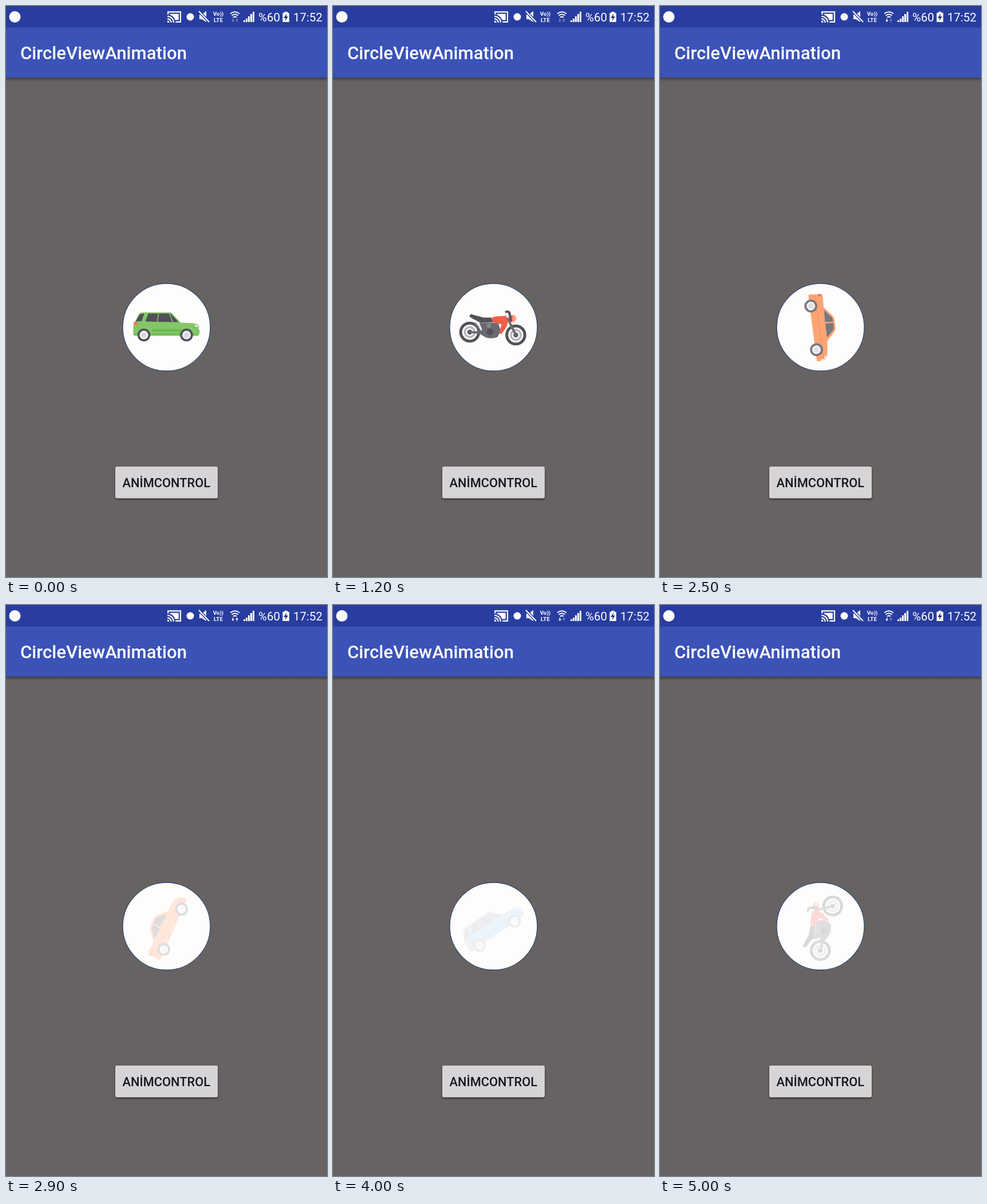
Animation, 561 px wide and 998 px high, one loop 5.1 s. Source, as an HTML page:

```html
<!DOCTYPE html>
<html lang="tr">
<head>
<meta charset="utf-8">
<title>CircleViewAnimation</title>
<style>
  html, body { margin: 0; width: 100%; height: 100%; overflow: hidden; background: #676362; }
  svg { display: block; width: 561px; height: 998px; font-family: Roboto, sans-serif; }
</style>
</head>
<body>
<svg viewBox="0 0 561 998">
  <defs>
    <linearGradient id="shade" x2="0" y2="1">
      <stop stop-opacity=".38"/><stop offset="1" stop-opacity="0"/>
    </linearGradient>
    <filter id="soft" x="-10%" y="-20%" width="120%" height="150%"><feGaussianBlur stdDeviation="1.6"/></filter>
    <g id="wheel">
      <circle r="11.3" fill="#515059"/><circle r="7.6" fill="#eeedf0"/><circle r="4.6" fill="#dad8dc"/>
    </g>
    <g id="spoked" fill="none">
      <circle r="15.8" stroke="#515059" stroke-width="5"/>
      <circle r="8.6" stroke="#b9b7bd" stroke-width="3.6"/>
      <circle r="4.2" fill="#515059"/>
    </g>
    <g id="hatchback">
      <path fill="currentColor" d="M-58 0L-56-8-49-22Q-47-26-42-26H4Q9-26 11-23L25-8 47-7Q55-6 57-2L56 3 58 6V10L55 15H-55Q-59 14-58 8Z"/>
      <path class="trim" d="M-23 5.5H24" stroke-width="4.5" stroke-linecap="round"/>
      <path class="trim" d="M-58 12H56" stroke-width="2"/>
      <path fill="#515059" d="M-54-10L-47-22Q-45-24-39-24L-43-11ZM-37-10L-32-24H6Q9-23 10-21L21-9 12-9Z"/>
      <path stroke="currentColor" stroke-width="1.6" fill="none" d="M-14-24L-16-9M5-24L11-9"/>
      <path fill="#ff7058" d="M-57-9H-51V-4H-58Z"/>
      <path fill="#fff0d0" d="M49-5Q55-4 56-1H52Q49-2 49-5Z"/>
      <use href="#wheel" x="-39.5" y="13.5"/><use href="#wheel" x="35" y="13.5"/>
    </g>
  </defs>

  <rect width="561" height="998" fill="#676362"/>
  <rect y="125" width="561" height="7" fill="url(#shade)"/>
  <rect width="561" height="125" fill="#3b53b7"/>
  <rect width="561" height="37.5" fill="#283d9f"/>
  <text x="25" y="93" font-size="31.2" font-weight="500" fill="#fff">CircleViewAnimation</text>

  <!-- status bar -->
  <g fill="#fff" stroke="none">
    <circle cx="15.5" cy="19" r="10"/>
    <g transform="translate(281 6) scale(1.09)" fill="none" stroke="#fff" stroke-width="2">
      <path d="M2 8V4H22V20H14M1 11A10 10 0 0 1 11 21M1 15A6 6 0 0 1 7 21"/>
      <path fill="#fff" stroke="none" d="M5 7H19V17H13.4A13 13 0 0 0 5 8.6ZM1 18A3 3 0 0 1 4 21H1Z"/>
    </g>
    <circle cx="322" cy="19" r="6.5"/>
    <path d="M338 15H342L350 9V28L342 23H338Z"/>
    <path d="M337 9L355 28" stroke="#283d9f" stroke-width="5"/>
    <path d="M337 9L355 28" stroke="#fff" stroke-width="2"/>
    <g font-size="9.8" font-weight="700" text-anchor="middle">
      <text x="371" y="17">Vo))</text><text x="371" y="28">LTE</text>
    </g>
    <g fill="none" stroke="#fff" stroke-width="2">
      <path d="M392 13.5Q400 7 408 13.5M394.5 16.8Q400 12.3 405.5 16.8M397 20Q400 17.6 403 20"/>
    </g>
    <path id="down" d="M395.8 22H397.2V25H399L396.5 28 394 25H395.8Z"/>
    <path id="up" d="M402.8 28H404.2V25H406L403.5 22 401 25H402.8Z"/>
    <path d="M415 25H418V28H415ZM419 22H422V28H419ZM423 18H426V28H423ZM427 14H430V28H427ZM431 10H434V28H431Z"/>
    <text x="441" y="27" font-size="20.5">%60</text>
    <path d="M486.5 10H492V12H495V28H483.500V12H486.500Z"/>
    <path d="M490.500 13L485.500 21H489L487.500 26.500 493 18.500H489.500Z" fill="#182560"/>
    <text x="502" y="27" font-size="20.5">17:52</text>
  </g>

  <circle cx="280.5" cy="561.5" r="76.5" fill="#fffdfc" stroke="#2e4a70" stroke-width="1.3"/>

  <g id="stage">
    <g id="green" color="#83c766" stroke="none"><use href="#hatchback" style="--trim:#6cb653"/></g>
    <g id="blue" color="#4fb3ef"><use href="#hatchback" style="--trim:#1793db"/></g>
    <g id="orange">
      <path fill="#ff8a4c" d="M-59 9L-57-9Q-56-11-53-11L-34-10-18-23Q-15-26-10-26H3Q8-26 11-23L25-9 47-6Q56-4 57 1L55 4 59 8 58 14H-56Q-60 14-59 9Z"/>
      <path d="M-56 2H55" stroke="#f47a3f" stroke-width="2"/>
      <path fill="#515059" d="M-29-10L-16-21Q-14-23-10-23H-7L-8-9ZM-5-23H2Q6-23 8-21L19-9H-5Z"/>
      <path fill="#e94b3b" d="M-58-8H-54V-3H-58Z"/>
      <path fill="#fff0d0" d="M50-4Q55-3 56 0H52Z"/>
      <use href="#wheel" x="-39" y="12"/><use href="#wheel" x="38" y="12"/>
    </g>
    <g id="moto">
      <g transform="rotate(-4.3)">
        <use href="#spoked" x="-41.5" y="8.500"/><use href="#spoked" x="39" y="13.500"/>
        <path d="M-41 8.500L-10 10M-32-6L-22 9M25-15L39 13.500" fill="none" stroke="#6a6972" stroke-width="4" stroke-linecap="round"/>
        <path fill="#6a6972" d="M-25-8H8L13 6 7 17Q-2 21-13 18L-25 11-20 4Z"/>
        <circle cx="-6" cy="8" r="6" fill="#515059"/><circle cx="-8" cy="-3" r="4" fill="#85838b"/>
        <path fill="#515059" d="M-42-20Q-41-24-36-22L-18-17-4-17 2-9-23-8-40-17Q-42-18-42-20Z"/>
        <path fill="#f15d45" d="M-4-15Q-1-19 6-19L22-20 26-12 23-1 14 12 10 10 14-5-1-9Z"/>
        <path fill="#ff9b83" d="M29-21Q38-23 40-16 40-10 34-9L29-10Z"/>
        <path fill="#f15d45" d="M27-21H33V-9H28Z"/>
        <path d="M22-27Q28-28 28-24L30-12" fill="none" stroke="#515059" stroke-width="4" stroke-linecap="round"/>
      </g>
    </g>
  </g>

  <rect x="191" y="807" width="179" height="55.500" rx="3" opacity=".55" filter="url(#soft)"/>
  <rect x="191" y="805" width="179" height="55.500" rx="3" fill="#d7d4d8"/>
  <text x="280.3" y="841" font-size="21.8" font-weight="500" text-anchor="middle" fill="#17161a">ANİMCONTROL</text>
</svg>
<style>.trim { stroke: var(--trim); fill: none; }</style>
<script>
const $ = id => document.getElementById(id);
const LOOP = 5100, STEP = 100, SPIN = 1000;
const turns = [['green', 75], ['moto', 1130], ['orange', 2182], ['blue', 3200], ['moto', 4299]];
const names = ['green', 'moto', 'orange', 'blue'];
const begin = performance.now();

function draw() {
  const t = Math.floor((performance.now() - begin) % LOOP / STEP) * STEP;
  const [name, start] = turns.find(([, s]) => t < s + SPIN);
  const x = Math.max(0, (t - start) / SPIN);
  const p = (1 - Math.cos(Math.PI * x)) / 2;   // accelerate, then decelerate
  for (const n of names) $(n).style.display = n === name ? '' : 'none';
  $('stage').setAttribute('transform', `translate(280.5 561.5) rotate(${360 * p})`);
  $('stage').setAttribute('opacity', 1 - p);

  // network activity arrows
  const sending = t >= 2200 && t < 2500 || t >= 2800 && t < 3900;
  $('down').setAttribute('opacity', t >= 1500 ? 1 : .4);
  $('up').setAttribute('opacity', sending ? 1 : .4);
  requestAnimationFrame(draw);
}
draw();
</script>
</body>
</html>
```
